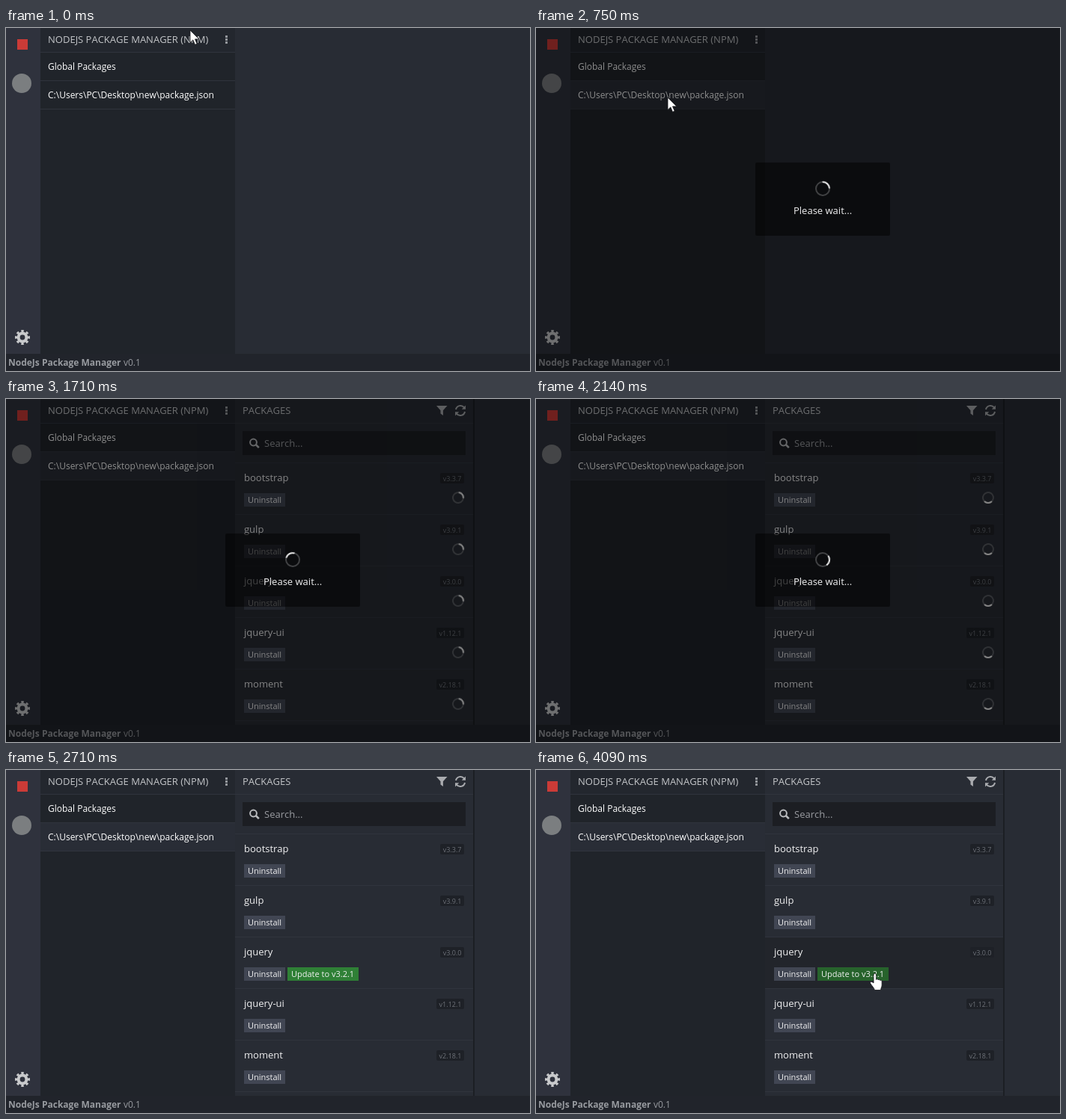
Animation, 700 px wide and 459 px high, one loop 4170 ms. Source, as an HTML page:

```html
<!DOCTYPE html>
<html lang="en">
<head>
<meta charset="utf-8">
<title>Package manager</title>
<style>
html, body { margin: 0; width: 100%; height: 100%; overflow: hidden; background: #282c34; }
svg { display: block; width: 700px; height: 459px; }
text { font: 13px "Open Sans", "Noto Sans", sans-serif; font-kerning: none; fill: #f0f0f1; white-space: pre; }
.title { fill: #c4c6c9; }
.item { font-size: 12px; fill: #fff; }
.small { font-size: 11px; }
.version { font-size: 9px; fill: #6d7178; text-anchor: end; }
.status { font-size: 12px; fill: #989ba0; }
.bold { font-weight: 700; }
.icon { fill: #c6c7c9; }
.line { fill: #30343d; }

/* Every timeline shares one loop; percentages are ms / 41.7 */
.t { animation: 4170ms step-end infinite; }
.spin { animation: spin 4170ms linear infinite; }
@keyframes spin { to { transform: rotate(1251deg); } }

.first-hover { animation-name: first-hover; }
.second-row { animation-name: second-row; }
.actions { animation-name: actions; }
.overlay { animation-name: overlay; }
.panel { animation-name: panel; }
.early { animation-name: early; }
.late { animation-name: late; }
.last { animation-name: last; }
.update { animation-name: update; }
.update-bg { animation-name: update-bg; }
.hover-2 { animation-name: hover-2; }
.hover-3 { animation-name: hover-3; }
.arrow { animation-name: arrow; }
.hand { animation-name: hand; }

@keyframes first-hover { 0%, 7.31% { visibility: hidden; } 3.71% { visibility: visible; } }
@keyframes second-row { 0% { visibility: hidden; } 7.31% { visibility: visible; } }
@keyframes actions { 0%, 17.74% { visibility: hidden; } 7.31% { visibility: visible; } }
@keyframes overlay { 0%, 64.98% { visibility: hidden; } 17.74% { visibility: visible; } }
@keyframes panel { 0% { visibility: hidden; } 37.64% { visibility: visible; } }
@keyframes early { 0%, 58.03% { visibility: hidden; } 37.64% { visibility: visible; } }
@keyframes late { 0%, 59.83% { visibility: hidden; } 37.64% { visibility: visible; } }
@keyframes last { 0%, 64.98% { visibility: hidden; } 37.64% { visibility: visible; } }
@keyframes update { 0% { visibility: hidden; } 59.83% { visibility: visible; } }
@keyframes update-bg { 0% { fill: #2f8036; } 90.76% { fill: #27632c; } }
@keyframes hover-2 { 0% { visibility: hidden; } 85.37% { visibility: visible; } }
@keyframes hover-3 { 0%, 85.37% { visibility: hidden; } 76.37% { visibility: visible; } }

@keyframes arrow {
  0% { transform: translate(245px, 3px); }
  1.91% { transform: translate(238px, 10px); }
  3.71% { transform: translate(222px, 35px); }
  5.51% { transform: translate(203px, 62px); }
  7.31% { transform: translate(184px, 86px); }
  9.11% { transform: translate(170px, 95px); }
  12.46% { transform: translate(175px, 93px); }
  26.73% { transform: translate(192px, 103px); }
  28.53% { transform: translate(232px, 125px); }
  30.45% { transform: translate(369px, 202px); }
  32.37% { transform: translate(530px, 285px); }
  34.17% { transform: translate(662px, 345px); }
  35.85% { transform: translate(720px, 375px); }
  74.58% { transform: translate(676px, 369px); }
  76.37% { transform: translate(720px, 375px); }
}
@keyframes hand {
  0% { transform: translate(720px, 360px); }
  76.37% { transform: translate(580px, 352px); }
  78.41% { transform: translate(505px, 333px); }
  80.21% { transform: translate(465px, 318px); }
  82.01% { transform: translate(440px, 305px); }
  83.69% { transform: translate(425px, 297px); }
  85.37% { transform: translate(415px, 291px); }
  87.05% { transform: translate(409px, 289px); }
  88.96% { transform: translate(414px, 286px); }
  90.76% { transform: translate(424px, 281px); }
  92.56% { transform: translate(433px, 277px); }
  94.48% { transform: translate(440px, 274px); }
  96.28% { transform: translate(444px, 273px); }
  98.08% { transform: translate(446px, 272px); }
}
</style>
</head>
<body>
<svg viewBox="0 0 700 459">
  <rect width="700" height="459" fill="#282c34"/>

  <!-- Tool bar -->
  <rect width="46" height="436" fill="#2f323d"/>
  <rect x="15" y="15" width="14" height="14" fill="#cb3b37"/>
  <circle cx="21" cy="74" r="13" fill="#7b7e80"/>
  <g transform="translate(22 414)" fill="none" stroke="#c9cacc">
    <circle r="5.4" stroke-width="4"/>
    <circle r="8.3" stroke-width="3.4" pathLength="16" stroke-dasharray="1 1" transform="rotate(-11.25)"/>
  </g>

  <!-- Project list -->
  <rect x="46" width="260" height="436" fill="#20242a"/>
  <rect x="46" width="260" height="32" fill="#23272e"/>
  <rect class="t first-hover" x="46" y="33" width="260" height="37" fill="#292d36"/>
  <rect class="t second-row" x="46" y="71" width="260" height="37" fill="#292d36"/>
  <g class="line">
    <rect x="46" y="32" width="260" height="1"/>
    <rect x="46" y="70" width="260" height="1"/>
    <rect x="46" y="108" width="260" height="1"/>
  </g>
  <text class="title" x="56" y="20">NODEJS PACKAGE MANAGER (NPM)</text>
  <path d="M293 10h3v3h-3zM293 14h3v3h-3zM293 18h3v3h-3z" fill="#94979c"/>
  <text class="item" x="56" y="56">Global Packages</text>
  <text class="item" x="56" y="94">C:\Users\PC\Desktop\new\package.json</text>
  <g class="t actions">
    <rect x="240" y="71" width="66" height="37" fill="#2f323d"/>
    <path d="M254 83.7h13.5M258.2 83.5v-2h5v2M256 84.5v11.2h9.6V84.5M258.8 86v8M260.8 86v8M262.8 86v8" fill="none" stroke="#c6c7c9" stroke-width="1.7"/>
    <path class="icon" d="M276.5 94V84.5q0-1.5 1.5-1.5h4q1.5 0 1.5 1.7h6q1.6 0 1.6 1.5V88H282q-1.5 0-2.5 1.3zM277 96.6l4-6.4q.6-1 1.7-1H295l-4 6.3q-.7 1.1-2 1.1z"/>
  </g>

  <!-- Packages -->
  <g class="t panel">
    <rect x="306" y="32" width="318" height="1" class="line"/>
    <rect x="624" width="2" height="436" fill="#1c1f24"/>
    <text class="title" x="316" y="20">PACKAGES</text>
    <path d="M575 9h14.5l-5.6 6.2V22l-3.4-2.6v-4.2zM614 8.6v5.2h-5.2zM600 22.4v-5.2h5.2z" fill="#a9abaf"/>
    <path d="M601 14a6.2 6.2 0 0 1 11-2.6M613 17a6.2 6.2 0 0 1-11 2.6" fill="none" stroke="#a9abaf" stroke-width="2"/>
    <rect x="316" y="43" width="298" height="32" fill="#1c1e23"/>
    <g fill="none" stroke="#b9bbbe" stroke-width="2">
      <circle cx="330.5" cy="58" r="4.4"/>
      <path d="M333.8 61.2l4 4" stroke-width="2.6"/>
    </g>
    <text x="345" y="64" style="fill:#9a9ca1">Search...</text>
  </g>
  <g id="rows"></g>

  <!-- Status bar -->
  <rect y="436" width="700" height="23" fill="#21242b"/>
  <text class="status bold" x="3" y="452">NodeJs Package Manager</text>
  <text class="status" x="157" y="452">v0.1</text>

  <!-- Wait dialog -->
  <g class="t overlay">
    <rect width="700" height="459" fill="#000" fill-opacity=".45"/>
    <rect x="293" y="180" width="180" height="98" rx="2" fill="#000" fill-opacity=".5"/>
    <g id="wait"></g>
    <text x="344" y="249">Please wait...</text>
  </g>

  <g fill="#fff" stroke="#15161a" stroke-width=".8" stroke-linejoin="round">
    <path class="t arrow" d="M1 0V16.5l3.8-3.6 2.7 6.4 2.7-1.1-2.7-6.3h5.3z"/>
    <path class="t hand" d="M5 13V2a1.7 1.7 0 0 1 3.4 0v6.5c.5-1.2 2.6-1 2.8.5.6-1 2.4-.8 2.6.7.8-.8 2.3-.4 2.3 1.2V16c0 2-1.2 3-1.6 6.5H6.4C6 19.8 2.5 16.7.7 13.4-.2 11.5 1.8 10.4 3.2 11.8z"/>
  </g>
</svg>
<script>
const byId = id => document.getElementById(id);

// Ring with a bright quarter, turned to its starting angle
function spinner(x, y, r, angle) {
  const c = r * Math.SQRT1_2;
  return `<g transform="translate(${x} ${y}) rotate(${angle})" fill="none" stroke-width="2">
    <circle r="${r}" stroke="#fff" stroke-opacity=".22"/>
    <path class="spin" d="M${-c} ${-c}A${r} ${r} 0 0 1 ${c} ${-c}" stroke="#f2f2f2"/>
  </g>`;
}

const packages = [
  ["bootstrap", "v3.3.7", 32, "early"],
  ["gulp", "v3.9.1", 32, "early"],
  ["jquery", "v3.0.0", 32, "late"],
  ["jquery-ui", "v1.12.1", 37, "late"],
  ["moment", "v2.18.1", 37, "last"]
];

const updateButton = `<g class="t update">
  <rect class="t update-bg" x="376" y="41" width="95" height="18"/>
  <text class="small" x="381" y="54">Update to v3.2.1</text>
</g>`;

const row = ([name, version, width, loading], i) => `<g transform="translate(0 ${85 + 69 * i})">
  ${i === 2 || i === 3 ? `<rect class="t hover-${i}" x="306" y="1" width="318" height="68" fill="#22252b"/>` : ""}
  <g class="t panel">
    <rect class="line" x="306" width="318" height="1"/>
    <text x="318" y="25">${name}</text>
    <rect x="${612 - width}" y="14" width="${width}" height="14" rx="2" fill="#1e2127"/>
    <text class="version" x="608.5" y="24.5">${version}</text>
    <rect x="318" y="41" width="55" height="18" fill="#414653"/>
    <text class="small" x="323" y="54">Uninstall</text>
  </g>
  <g class="t ${loading}">${spinner(604, 47, 7, 258)}</g>
  ${name === "jquery" ? updateButton : ""}
</g>`;

byId("rows").innerHTML = packages.map(row).join("") +
  '<rect class="line t panel" x="306" y="430" width="318" height="1"/>';
byId("wait").innerHTML = spinner(383, 215, 9, 178);
</script>
</body>
</html>
```
